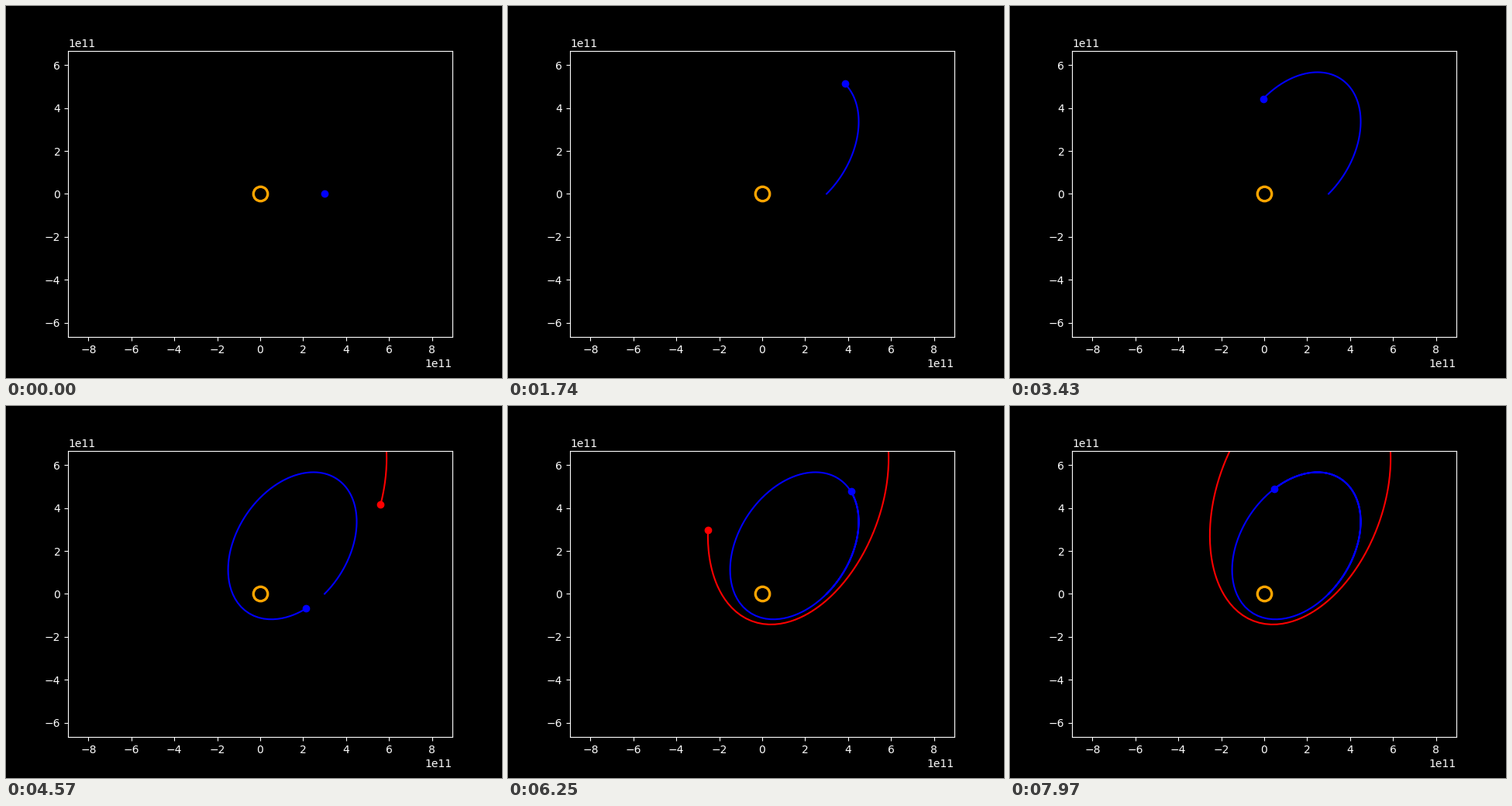
These frames come from a looping animation (640 by 480 pixels, 7990 ms). A matplotlib script:

```python
import numpy as np
import matplotlib.pyplot as plt
from matplotlib.animation import FuncAnimation
from matplotlib.markers import TICKDOWN, TICKLEFT

LOOP_MS, TICK_MS = 7990, 10
STEPS = 399
SCALE = 27.7e-11            # pixels per metre
HALF_W, HALF_H = 248 / SCALE, 184.8 / SCALE


def kepler_path(a, e, apo_angle, mean, spin):
    """Orbit around the origin; spin is +1 counterclockwise, -1 clockwise."""
    ecc = mean + e * np.sin(mean)
    for _ in range(30):
        ecc -= (ecc - e * np.sin(ecc) - mean) / (1 - e * np.cos(ecc))
    along = a * (np.cos(ecc) - e)
    across = spin * a * np.sqrt(1 - e * e) * np.sin(ecc)
    c, s = -np.cos(apo_angle), -np.sin(apo_angle)
    return along * c - across * s, along * s + across * c


def launch_path(r0, a, rate, steps):
    """Orbit starting at (r0, 0) with velocity at 45 degrees."""
    q = r0 / a
    e_cos, e_sin = 1 - q, np.sqrt(q * (2 - q) / 2)
    e = np.hypot(e_cos, e_sin)
    ecc = np.arctan2(e_sin, e_cos)
    anomaly = np.arccos((q * (2 - q) / 2 / q - 1) / e)
    return kepler_path(a, e, np.pi - anomaly, ecc - e_sin + rate * steps, 1)


steps = np.arange(STEPS)
blue = launch_path(3e11, 3.74e11, 0.0266, steps)
red = kepler_path(171 / SCALE, 0.7803, np.radians(69.6),
                  0.01618 * (steps - 287.9), -1)

plt.rcParams["font.family"] = "DejaVu Sans"
fig = plt.figure(figsize=(6.4, 4.8), dpi=100, facecolor="black")
ax = fig.add_axes([0.125, 0.11, 0.775, 0.77], facecolor="black")
ax.spines[:].set_color("white")
ax.set_xticks([])
ax.set_yticks([])


# Fixed tick marks and labels are cheaper to redraw than live axes.
def number(v):
    return str(v).replace("-", "\u2212")


mark = dict(ls="", ms=3.5, mew=0.8, color="white", clip_on=False)
xs, ys = range(-8, 9, 2), range(-6, 7, 2)
ax.plot([v * 1e11 for v in xs], [0] * len(xs), marker=TICKDOWN,
        transform=ax.get_xaxis_transform(), **mark)
ax.plot([0] * len(ys), [v * 1e11 for v in ys], marker=TICKLEFT,
        transform=ax.get_yaxis_transform(), **mark)

trans, va, ha = ax.get_xaxis_text1_transform(7)
for v in xs:
    label = ax.text(v * 1e11, 0, number(v), transform=trans, va=va, ha=ha,
                    color="white")
trans, va, ha = ax.get_yaxis_text1_transform(7)
for v in ys:
    ax.text(0, v * 1e11, number(v), transform=trans, va=va, ha=ha,
            color="white")
ax.annotate("1e11", (1, 0), xycoords=("axes fraction", label), xytext=(0, -3),
            textcoords="offset points", va="top", ha="right", color="white")
ax.annotate("1e11", (0, 1), xycoords="axes fraction", xytext=(0, 3),
            textcoords="offset points", va="baseline", ha="left",
            color="white")

ax.plot(0, 0, "o", ms=13.3, mew=2.4, mfc="none", mec="orange")
bodies = []
for path, color in ((blue, "blue"), (red, "red")):
    trail, = ax.plot([], [], color=color, lw=1.5)
    dot, = ax.plot([], [], "o", color=color)
    bodies.append((path, trail, dot))
ax.set_xlim(-HALF_W, HALF_W)
ax.set_ylim(-HALF_H, HALF_H)


def update(i):
    t = i * TICK_MS
    # One step lasts 30 ms, all others 20 ms.
    k = (t if t < 2000 else t - 10) // 20
    for (x, y), trail, dot in bodies:
        trail.set_data(x[:k + 1], y[:k + 1])
        dot.set_data(x[k:k + 1], y[k:k + 1])
    return [artist for body in bodies for artist in body[1:]]


anim = FuncAnimation(fig, update, frames=LOOP_MS // TICK_MS, interval=TICK_MS,
                     repeat=True, repeat_delay=0, cache_frame_data=False)
plt.show()
```
